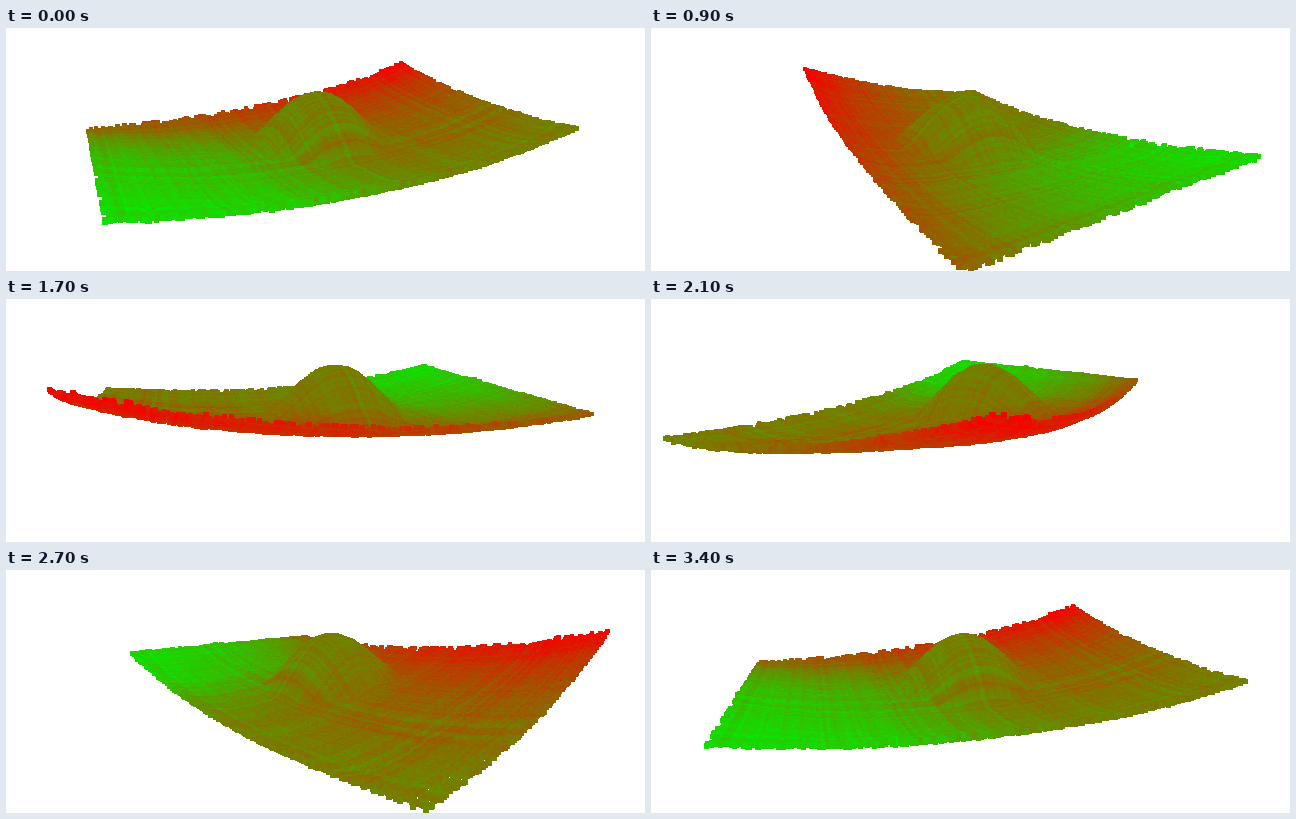
A matplotlib script that plays this animation: 639x243 px, repeating every 3500 ms.

```python
import numpy as np
import matplotlib.pyplot as plt
from matplotlib.animation import FuncAnimation

W, H, DPI = 639, 243, 100
FRAMES, INTERVAL = 35, 100
NU, NV = 190, 120

# camera: screen centre, scale, perspective strength, horizon line
CX, SCALE, PERSP, HORIZON = 321, 241, 0.59, 5.5
HALF = np.radians(58.5)
HEADING = -30.5

rng = np.random.default_rng(11)
u, v = np.meshgrid(np.linspace(-1, 1, NU), np.linspace(-1, 1, NV))
q, p = (1 + u) / 2, (1 + v) / 2

# ground coordinates, the low edge slightly sheared outwards
px = u * np.sin(HALF) + .025 * (1 - p)
py = v * np.cos(HALF) - .01 * (1 - p)
rad = np.hypot(px + .02, py - .045) / .28
dome = np.cos(np.pi / 2 * np.clip(rad, 0, 1)) ** 1.2
ridge = np.exp(-((v + .33 + .16 * u) / .035) ** 2)


def mix(a, b, t):
    return a + (b - a) * t


def stripes(amount):
    """Random lines running both ways across the grid."""
    return rng.normal(0, amount, (NV, 1)) + rng.normal(0, amount, (1, NU))


def drop():
    """Depth of the terrain below the camera, blended from its four edges."""
    near_l, near_r, far_l, far_r = 91, 94, 98, 46
    low = mix(near_l, near_r, q) + 15 * (1 - u ** 2)
    high = mix(far_l, far_r, q ** 2.4)
    left = mix(near_l, far_l, p)
    right = mix(near_r, far_r, p ** 1.8)
    t = p ** 2
    corners = mix(mix(near_l, near_r, q), mix(far_l, far_r, q), t)
    base = mix(low, high, t) + mix(left, right, q) - corners
    base += 9 * (1 - v ** 8) * (1 - u ** 4)
    return mix(base, 62, dome) - 2 * ridge * (1 - dome) + stripes(.4)


def tint():
    """Share of red over the terrain, the rest is green."""
    flat = .16 + .38 / (1 + np.exp(-6 * (u + .3))) - .08 * (1 - p) ** 4
    red = mix(flat, .78 + .2 * u, p ** 2.6)
    red = mix(red, .47, np.clip(dome * 2.5, 0, .9)) + .04 * ridge
    red += stripes(.024) + rng.normal(0, .012, u.shape)
    red[np.hypot((u + .5) * 1.6, v + .92) < .022] = 0
    return np.clip(red, 0, 1)


def ragged(n, shape):
    """True for grid lines inside a randomly trimmed border."""
    line = np.arange(n).reshape(-1 if shape[1] == 1 else 1, -1 if shape[1] > 1 else 1)
    return line


col, row = np.arange(NU)[None, :], np.arange(NV)[:, None]
trim_u, trim_v = rng.integers(0, 2, (2, NV, 1)), rng.integers(0, 3, (2, 1, NU))
keep = ((col >= trim_u[0]) & (col < NU - trim_u[1])
        & (row >= trim_v[0]) & (row < NV - trim_v[1]))

px, py, depth, red = (a[keep] for a in (px, py, drop(), tint()))
colors = np.column_stack([.97 * red, .94 * (1 - red), 0 * red, 0 * red + 1])

fig = plt.figure(figsize=(W / DPI, H / DPI), dpi=DPI, facecolor="white")
ax = fig.add_axes([0, 0, 1, 1])
ax.set_xlim(0, W)
ax.set_ylim(H, 0)
ax.axis("off")
dots = ax.scatter(px, py, s=9, c=colors, marker="s", linewidths=0, antialiased=False)


def update(i):
    # ten degrees a step, with one double step late in the turn
    turn = 10 * (i + (i >= 26))
    a = np.radians(HEADING - turn)
    x = px * np.cos(a) + py * np.sin(a)
    z = -px * np.sin(a) + py * np.cos(a)
    dist = 1 + PERSP * z
    order = np.argsort(-dist)
    sx = CX + SCALE * x / dist
    sy = HORIZON + depth / dist
    size = ((3.3 + 1.2 / dist) * 72 / DPI) ** 2
    dots.set_offsets(np.column_stack([sx, sy])[order])
    dots.set_sizes(size[order], DPI)
    dots.set_facecolors(colors[order])
    return dots,


anim = FuncAnimation(fig, update, frames=FRAMES, interval=INTERVAL, repeat=True, repeat_delay=0)
plt.show()
```
